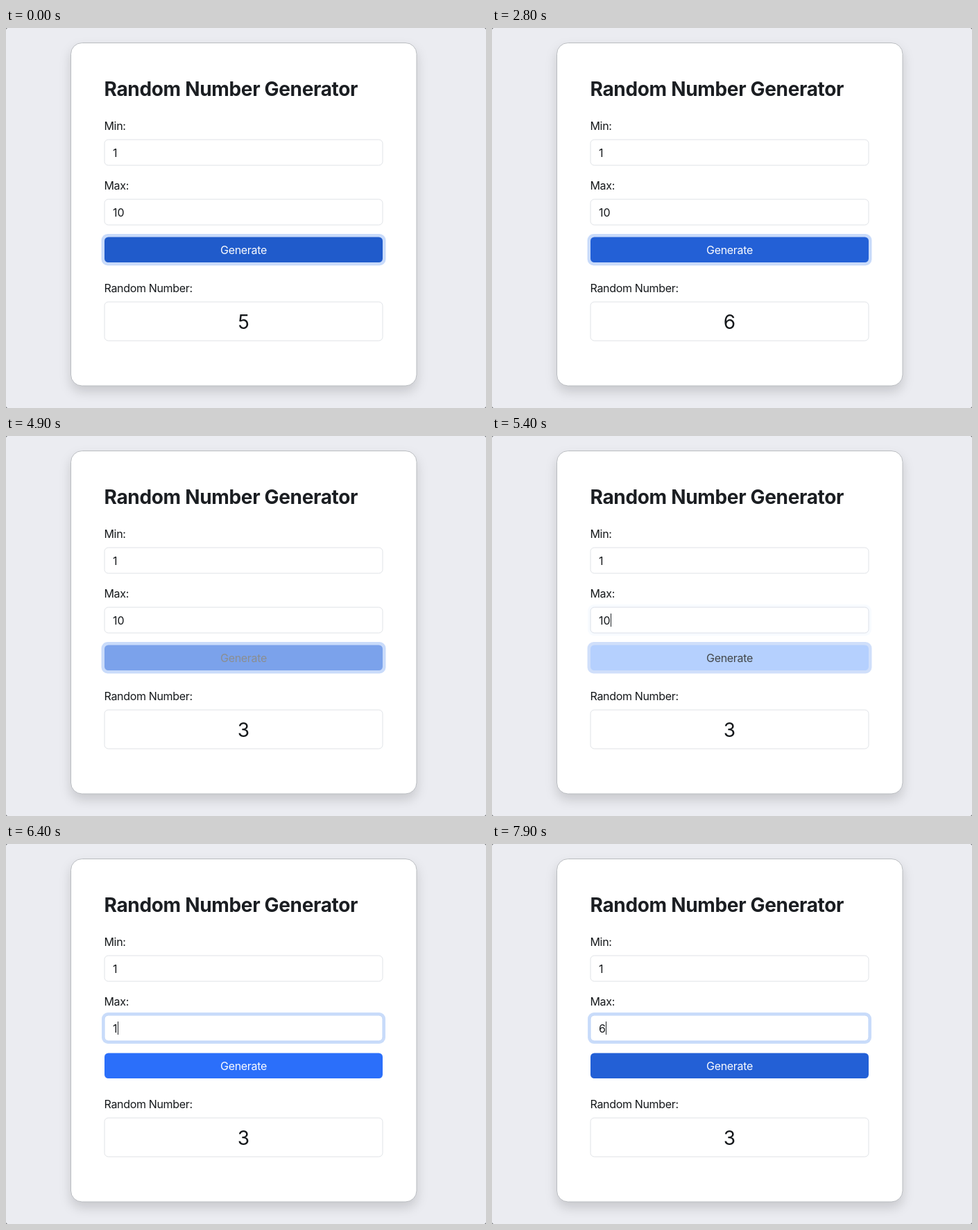
An HTML page for the animation above (8 s loop, 692x548 px).

```html
<!DOCTYPE html>
<html lang="en">
<head>
<meta charset="utf-8">
<title>Random Number Generator</title>
<style>
html, body { margin: 0; width: 100%; height: 100%; overflow: hidden; background: #ebecf1; }
svg { display: block; width: 692px; height: 548px; font-family: Inter, "Liberation Sans", sans-serif; }
text { font-size: 16px; fill: #15181b; }
.card { fill: #fff; stroke: #b9bcc0; filter: drop-shadow(0 8px 8px rgba(0, 0, 0, .15)); }
.field { fill: #fff; stroke: #dfe2e6; }
.title { font-size: 28px; font-weight: 700; letter-spacing: -.33px; fill: #1b1e22; }
.label { letter-spacing: -.33px; }
.mid { text-anchor: middle; }
</style>
</head>
<body>
<svg viewBox="0 0 692 548">
  <rect width="692" height="548" fill="#ebecf1"/>
  <path d="M0 0h2L0 2zM692 0v2l-2-2zM0 548v-2l2 2zM692 548h-2l2-2z" fill="#77797d"/>
  <rect class="card" x="93.5" y="21.5" width="498.5" height="494.5" rx="16"/>
  <text class="title" x="141.5" y="97.6">Random Number Generator</text>
  <text class="label" x="141.5" y="146.5">Min:</text>
  <rect class="field" x="142" y="161" width="401" height="37" rx="5.5"/>
  <text x="154" y="185.5">1</text>
  <text class="label" x="141.5" y="232.5">Max:</text>
  <rect id="maxRing" x="138" y="243" width="409" height="45" rx="9" fill="#c9dcfa"/>
  <rect id="maxField" class="field" x="142" y="247" width="401" height="37" rx="5.5"/>
  <text id="maxText" x="154" y="271.5"></text>
  <rect id="caret" y="256" width="1" height="19" fill="#212529"/>
  <rect id="btnRing" x="137.5" y="297" width="410" height="45.5" rx="9" fill="#c9dbfa"/>
  <rect id="btn" x="142" y="301.5" width="401" height="36.5" rx="5.5"/>
  <text id="btnText" class="mid label" x="342.5" y="325.5">Generate</text>
  <text class="label" x="141.5" y="380.5">Random Number:</text>
  <rect class="field" x="142" y="395" width="401" height="56" rx="5.5"/>
  <text id="result" class="mid" x="342.5" y="433.8" style="font-size:28px"></text>
</svg>
<script>
const $ = id => document.getElementById(id);
const LOOP = 8000;
const IDLE = [43, 111, 250], HOVER = [35, 96, 214], ACTIVE = [32, 91, 203], FOCUSED = [207, 226, 255];
const WHITE = [250, 251, 254], DARK = [33, 37, 41];
const HOLD = 140;

// press time, number shown on release
const CLICKS = [
  [-100, 8], [250, 2], [560, 4], [1060, 9], [1300, 7], [1760, 10], [2000, 2],
  [2460, 6], [2960, 1], [3180, 9], [3400, 5], [3810, 8], [4060, 4], [4300, 3]
];

const ramp = (t, from, span) => Math.min(1, Math.max(0, (t - from) / span));
const mix = (a, b, k) => a.map((v, i) => v + (b[i] - v) * k);
const rgb = c => `rgb(${c.map(Math.round)})`;
const set = (id, attrs) => {
  for (const name in attrs) $(id).setAttribute(name, attrs[name]);
};

// The focused button turns pale when the pointer leaves, blue again on blur.
function buttonColors(t, press) {
  const leave = ramp(t, 4850, 100), blur = ramp(t, 5380, 134);
  const pressed = ramp(t, press, 90) - ramp(t, press + HOLD, 150);
  const hovered = mix(HOVER, ACTIVE, pressed);
  const rest = mix(mix(hovered, FOCUSED, leave), IDLE, blur);
  return {
    fill: mix(rest, HOVER, ramp(t, 7560, 140)),
    text: mix(WHITE, DARK, leave * (1 - blur))
  };
}

function maxValue(t) {
  if (t < 6200) return "10";
  if (t < 6600) return "1";
  return t < 6900 ? "" : "6";
}

function caretOn(t) {
  return t >= 5400 && t < 5900 || t >= 6400 && t < 7400 || t >= 7900;
}

function draw(t) {
  const [press] = CLICKS.filter(c => c[0] <= t).pop();
  const done = CLICKS.filter(c => c[0] + HOLD <= t).pop();
  const { fill, text } = buttonColors(t, press);
  const focus = ramp(t, 5380, 160);
  const value = maxValue(t);

  $("result").textContent = done ? done[1] : 5;
  $("maxText").textContent = value;
  set("btn", { fill: rgb(fill) });
  set("btnText", { style: `fill:${rgb(text)}` });
  set("btnRing", { opacity: 1 - focus });
  set("maxRing", { opacity: focus });
  set("maxField", { style: `stroke:${rgb(mix([223, 226, 230], [190, 212, 248], focus))}` });
  set("caret", {
    x: { "10": 171, "1": 161, "6": 164, "": 154 }[value],
    opacity: caretOn(t) ? 1 : 0
  });
}

const start = performance.now();
function tick() {
  draw((performance.now() - start) % LOOP);
  requestAnimationFrame(tick);
}
tick();
</script>
</body>
</html>
```
